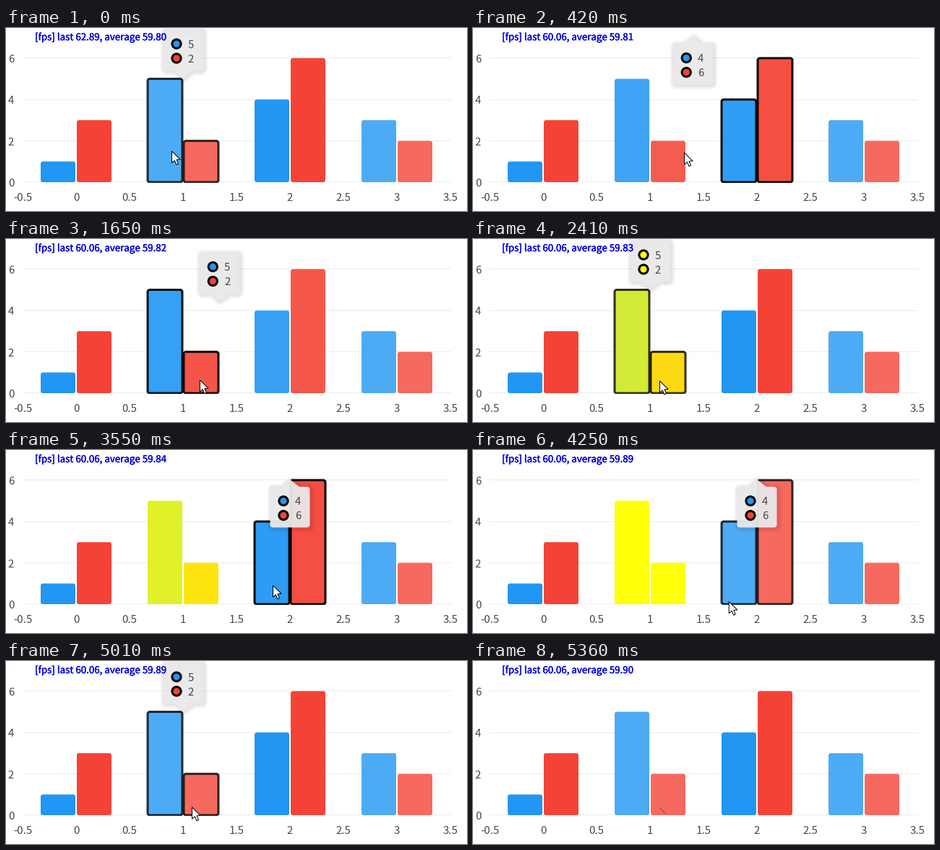
Animation, 638 px wide and 254 px high, one loop 6160 ms. Source, as a matplotlib script:

```python
import numpy as np
import matplotlib.pyplot as plt
from matplotlib.animation import FuncAnimation
from matplotlib.colors import to_rgb
from matplotlib.patches import Circle, FancyBboxPatch, PathPatch, Polygon, Rectangle
from matplotlib.path import Path
from matplotlib.patheffects import withStroke
from matplotlib.transforms import Affine2D

W, H, DPI = 638, 254, 100
PT = 72 / DPI  # points per pixel
STEP, LOOP = 20, 6160

BLUE, RED, YELLOW, TEXT_BLUE = "#2196f3", "#f44336", "#ffff08", "#0000dc"
INK = "#464646"
FONT = "Noto Sans CJK JP"
SERIES = [(BLUE, (1, 5, 4, 3), -49), (RED, (3, 2, 6, 2), 1)]
BAR_W = 48

# All times in ms
FADE = 400
HOVERS = [(-1000, 1, 305), (350, 2, 305), (1510, 1, 305),  # start, category, glide
          (3480, 2, 60), (4265, 1, 305)]
POINTER_START = (229.5, 171)
MOVES = [(70, 1000, (418.5, 177.5)), (1370, 1700, (258.5, 197)),  # start, end, goal
         (3480, 3550, (369.5, 188)), (3620, 3980, (400, 214)),
         (4110, 4480, (257.5, 203)), (5010, 5290, (262, 225))]
HIGHLIGHT = (2000, 4880)
LEAVE = 5360


def px(value):
    return 23 + 148 * (value + 0.5)


def py(value):
    return 214 - 28.7 * value


def blend(top, bottom, alpha):
    return tuple(alpha * np.array(to_rgb(top)) + (1 - alpha) * np.array(to_rgb(bottom)))


def progress(t, start, length):
    return min(max((t - start) / length, 0), 1)


def current_hover(t):
    return [h for h in HOVERS if h[0] <= t][-1]


def opacity(category, t):
    """The hovered pair fades to 0.8 while the one just left fades back."""
    if category in (0, 3):
        return 1 if category == 0 else 0.8
    start, hovered, _ = current_hover(t)
    fade = 0.2 * progress(t, start, FADE) ** 0.7
    return 1 - fade if category == hovered else 0.8 + fade


def tooltip_place(t):
    """Centre and top of the tooltip, gliding from the other category."""
    start, hovered, glide = current_hover(t)
    rest = {1: np.array([245, 2.3]), 2: np.array([393, 51])}
    eased = np.sin(progress(t, start, glide) * np.pi / 2)
    return rest[3 - hovered] + (rest[hovered] - rest[3 - hovered]) * eased


def pointer_place(t):
    place = np.array(POINTER_START)
    for start, end, goal in MOVES:
        p = progress(t, start, end - start)
        place = place + (np.array(goal) - place) * p * p * (3 - 2 * p)
    return place


def fps_label(t):
    """One reading a second; the fifth lifts the average further."""
    tick = int((t - 70) // 1000) + 1 if t < LEAVE else 6
    last = 60.06 if tick else 62.89
    average = 59.80 + 0.01 * tick + (0.04 if tick >= 5 else 0)
    return f"[fps] last {last:.2f}, average {average:.2f}"


def bubble(cx, top, points_up):
    l, r, b, c, a = cx - 27.5, cx + 27.5, top + 56.5, 4, 13
    M, L, Q = Path.MOVETO, Path.LINETO, Path.CURVE3
    up = [(cx - a, top), (cx, top - 10), (cx + a, top)] if points_up else []
    down = [] if points_up else [(cx + a, b), (cx, b + 10), (cx - a, b)]
    parts = [(M, [(l + c, top)]), (L, up + [(r - c, top)]), (Q, [(r, top), (r, top + c)]),
             (L, [(r, b - c)]), (Q, [(r, b), (r - c, b)]),
             (L, down + [(l + c, b)]), (Q, [(l, b), (l, b - c)]),
             (L, [(l, top + c)]), (Q, [(l, top), (l + c, top)])]
    return Path([p for _, pts in parts for p in pts],
                [code for code, pts in parts for _ in pts])


fig = plt.figure(figsize=(W / DPI, H / DPI), dpi=DPI, facecolor="white")
ax = fig.add_axes([0, 0, 1, 1])
ax.set(xlim=(0, W), ylim=(H, 0))
ax.axis("off")


def label(x, y, text, size=15, color=INK, **kw):
    return ax.text(x, y, text, family=FONT, fontsize=size * PT, color=color, **kw)


def add(patch):
    return ax.add_patch(patch)


def rounded_bar(x, y, **kw):
    return add(FancyBboxPatch((x, y), BAR_W, 214 - y,
                              boxstyle="round,pad=0,rounding_size=3", **kw))


for v in (0, 2, 4, 6):
    ax.plot([23, 615], [py(v) - 0.6] * 2, color="#ebebeb", lw=PT, zorder=1)
    label(7, py(v) + 6, str(v), ha="center")
for v in np.arange(-0.5, 3.6, 0.5):
    label(px(v), 240.5, f"{v:g}", ha="center")

bars = []
plot_area = Rectangle((0, 0), W, 214.5, transform=ax.transData)
for base, values, dx in SERIES:
    for category, v in enumerate(values):
        x, y = px(category) + dx, py(v)
        fill = rounded_bar(x, y, ec="none", zorder=2)
        edge = rounded_bar(x, y, fc="none", lw=3 * PT, zorder=3)
        edge.set_clip_path(plot_area)
        bars.append((category, base, fill, edge))

# Tooltip: soft shadow, body, two markers with values
blank = bubble(0, 0, False)
shadow_shift = Affine2D().translate(1.5, 1.5) + ax.transData
shadows = [add(PathPatch(blank, fc="none", ec=(.3, .08, .18, .02), lw=2 * k * PT,
                         transform=shadow_shift, zorder=5, joinstyle="round"))
           for k in range(1, 7)]
body = add(PathPatch(blank, fc=(.918, .914, .918, .95), ec="none", zorder=6))
markers = [add(Circle((0, 0), 6.1, ec="black", lw=3 * PT, zorder=7)) for _ in SERIES]
counts = [label(0, 0, "", zorder=7) for _ in SERIES]
tooltip = shadows + [body] + markers + counts

fps_text = label(40, 17, "", size=13.33, color=TEXT_BLUE, zorder=8,
                 path_effects=[withStroke(linewidth=0.35 * PT, foreground=TEXT_BLUE)])

ARROW = np.array([(0, 0), (0, 16.3), (3.8, 12.8), (6.4, 18.8), (9, 17.7),
                  (6.5, 11.8), (11.6, 11.5)])
pointer = add(Polygon(ARROW, fc="white", ec="black", lw=PT, zorder=9))
trace, = ax.plot([258, 266.5], [203.8, 211.5], color="#555555", lw=0.9 * PT, zorder=4)


def draw(i):
    t = i * STEP + STEP / 2
    inside = t < LEAVE
    hovered = current_hover(t)[1]
    highlighted = HIGHLIGHT[0] <= t < HIGHLIGHT[1]

    for category, base, fill, edge in bars:
        alpha = opacity(category, t)
        lit = highlighted and category == 1
        fill.set_facecolor(blend(YELLOW, base, alpha) if lit else blend(base, "white", alpha))
        edge.set_visible(inside and category == hovered)
        edge.set_edgecolor((0, 0, 0, alpha))

    for part in tooltip + [pointer]:
        part.set_visible(inside)
    trace.set_visible(not inside)

    cx, top = tooltip_place(t)
    path = bubble(cx, top, hovered == 2)
    for part in shadows + [body]:
        part.set_path(path)
    for row, (base, values, _) in enumerate(SERIES):
        y = top + 19.7 + 20 * row
        markers[row].center = cx - 9, y
        markers[row].set_facecolor(YELLOW if highlighted and hovered == 1 else base)
        counts[row].set_position((cx + 6.7, y + 5.5))
        counts[row].set_text(str(values[hovered]))

    fps_text.set_text(fps_label(t))
    pointer.set_xy(ARROW + pointer_place(t))


anim = FuncAnimation(fig, draw, frames=LOOP // STEP, interval=STEP,
                     repeat=True, repeat_delay=0)
plt.show()
```
